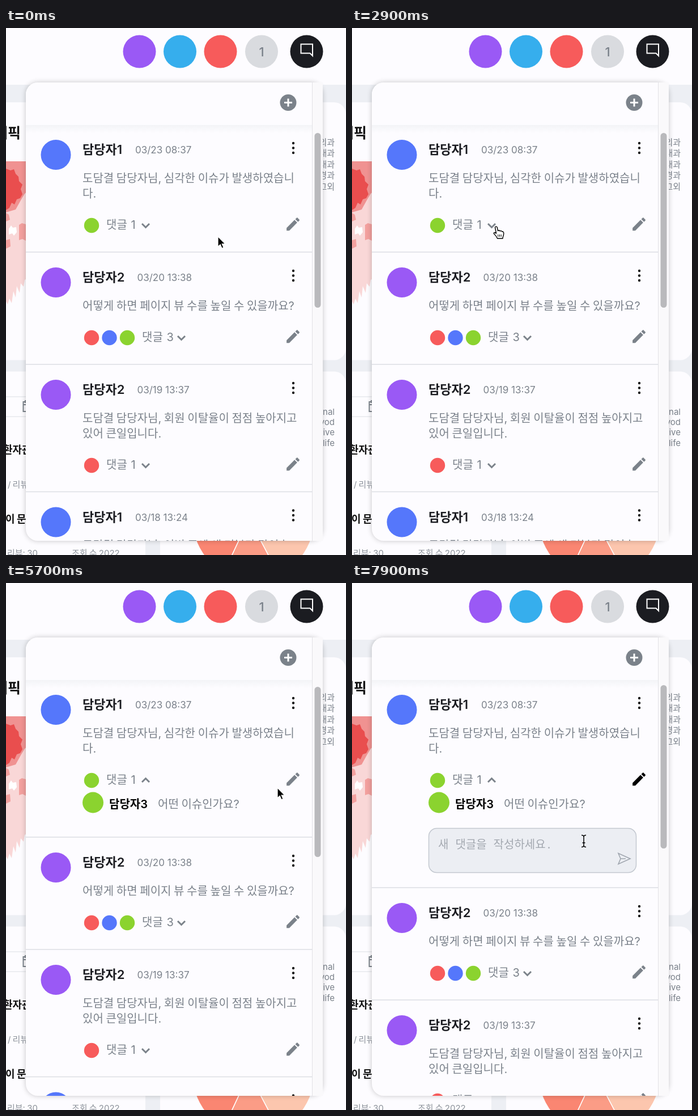
Animation, 600 px wide and 929 px high, one loop 8000 ms. Source, as an HTML page:

```html
<!DOCTYPE html>
<html lang="ko">
<head>
<meta charset="utf-8">
<style>
html, body { margin: 0; width: 100%; height: 100%; overflow: hidden; background: #edeff4; }
svg { display: block; width: 100vw; height: 100vh; }
text { font: 20px Inter, "Noto Sans CJK KR", "Noto Sans CJK", sans-serif; fill: #7a818a; word-spacing: -1px; white-space: pre; }
.name { font-size: 22px; font-weight: 600; fill: #1b1c21; }
.who { font-weight: 600; fill: #000; }
.date { font-size: 17px; word-spacing: 0; }
.count { word-spacing: 1px; }
.side { font-size: 15px; text-anchor: end; }
.small { font-size: 15px; fill: #8d939b; }
.bold { font-size: 18px; font-weight: 600; fill: #111; }
.hint { font-family: "Noto Sans Mono", "Noto Sans CJK KR", monospace; fill: #a3a8b0; word-spacing: 0; }
.line { fill: none; stroke: #7b828a; stroke-width: 3; }
.card { fill: #fdfcff; }
.pencil { fill: #7b828a; }
</style>
</head>
<body>
<svg viewBox="0 0 600 929" preserveAspectRatio="none">
  <defs>
    <clipPath id="inside"><rect x="35" y="96" width="524" height="808" rx="21"/></clipPath>
    <clipPath id="pie"><circle cx="436.5" cy="866" r="107"/></clipPath>
    <filter id="blur" x="-20%" y="-20%" width="140%" height="140%"><feGaussianBlur stdDeviation="5"/></filter>
    <linearGradient id="fade" x2="0" y2="1">
      <stop stop-color="#f3f4f7"/><stop offset="1" stop-color="#fdfcff"/>
    </linearGradient>
  </defs>

  <rect class="card" width="600" height="100"/>
  <rect class="card" x="-50" y="131" width="650" height="454.5" rx="21"/>
  <rect class="card" x="-50" y="605.5" width="296" height="400" rx="21"/>
  <rect class="card" x="272" y="605.5" width="328" height="400" rx="21"/>

  <g id="behind">
    <path fill="#f9d7d7" d="M0 235H40V440l-7 4-2 12-5-6-2 17-5-12-2 20-4-11-3 21-4-8-3 10-3-5z"/>
    <path fill="#f09291" d="M0 235H40V286l-7 6-6 10-10 18-17 5z"/>
    <path fill="#e94e4e" d="M0 248l8 3 6-2 3 8 5 5 1 8 6 6-3 8 3 9-4 7-6 2-4 9-5-3-4 9-6 4z"/>
    <path fill="#f2a09e" d="M0 326l5 3 2 9-7 3zM0 374l7-2 1 13-8 4zM23 347l5-3 7 2v29l-6-3-6 2z"/>
    <path fill="#fff" d="M5 354l4-6 3 4 6-1 1 9-5 6-3-4-6 2z"/>
    <text x="26" y="194" text-anchor="end" class="bold" style="font-size:25px">트래픽</text>
    <path d="M0 650H40M0 685H40" stroke="#dcdfe4"/>
    <path d="M40 659H30.5V676H40M30 664H40M34 656V661" class="line" style="stroke-width:2"/>
    <text x="-5" y="750" class="bold">환자관리</text>
    <text x="3" y="810" class="small">/ 리뷰</text>
    <text x="-1" y="872" class="bold">이 문</text>
    <text x="2" y="931" class="small">리뷰: 30</text>
    <text x="116" y="931" class="small">조회 수 2022</text>
    <g clip-path="url(#pie)" stroke="#fff" stroke-width="1.5">
      <path fill="#fa8672" d="M300 850H436L398 931H300z"/>
      <path fill="#fb9c86" d="M436 850L398 931H464L424 854z"/>
      <path fill="#fcc6ae" d="M421 850L464 931H580V850z"/>
    </g>
  </g>

  <g id="top"></g>
  <path d="M520.5 28.5H541V49l-4.5-4.5H520.5z" class="line" style="stroke:#fff;stroke-width:2"/>
  <text x="451" y="50" text-anchor="middle" style="font-size:22px;font-weight:500">1</text>

  <rect x="35" y="96" width="524" height="808" rx="21" opacity=".22" filter="url(#blur)"/>
  <rect class="card" x="35" y="96" width="524" height="808" rx="21"/>
  <g clip-path="url(#inside)">
    <rect x="35" y="171" width="505" height="14" fill="url(#fade)"/>
    <g id="list"></g>
    <rect class="card" x="35" y="96" width="505" height="75"/>
    <circle cx="498" cy="131.5" r="14.5" fill="#7b828a"/>
    <path d="M491 131.5H505M498 124.5V138.5" class="line" style="stroke:#fff"/>
  </g>
  <path d="M540 96H559V904H540z" fill="#faf9fb"/>
  <path d="M540.5 96V904" stroke="#e2e2e6"/>
  <rect id="thumb" x="544.5" width="11" rx="5.5" fill="#b9b9bc"/>
  <g id="cursor">
    <path id="arrow" d="M0 0V18L4.2 14.2 7 20.8 10 19.5 7.2 13.1H12.8z" stroke="#fff" stroke-width="1.2"/>
    <g id="hand" fill="#fff" stroke="#000" stroke-width="1.4" stroke-linejoin="round">
      <path d="M-2 1.5C-2-.5 1-.8 1.7 1.5L3 7.5C4 6.3 6.3 6.5 6.6 8 8 7 10 7.7 10.2 9 11.8 8.4 13.2 9.5 13.2 11.5 13.5 16 11.5 17 11.5 21H2C1 18-1.5 15.5-4 12.5-5 10.5-2.5 9.8-1 11.5L0 12z"/>
      <path d="M3.3 14V18M6 14V18M8.7 14V18" stroke-width="1"/>
    </g>
    <g id="beam" fill="none">
      <path d="M-4-10.5Q0-10.5 0-7.500V7.5Q0 10.5-4 10.5M4-10.5Q0-10.5 0-7.5M4 10.5Q0 10.5 0 7.5M-2.5 3H2.5" stroke="#000" stroke-width="1.5"/>
    </g>
  </g>
</svg>
<script>
const $ = id => document.getElementById(id);
const PURPLE = '#9a59f5', BLUE = '#5577fb', RED = '#f75b5b', GREEN = '#8bd32f', SKY = '#36aeed';
const dot = (x, y, r, fill) => `<circle cx="${x}" cy="${y}" r="${r}" fill="${fill}"/>`;
const label = (x, y, s, cls = '') => `<text x="${x}" y="${y}" class="${cls}">${s}</text>`;

$('top').innerHTML = [PURPLE, SKY, RED, '#d9dbdf', '#1b1c21']
  .map((c, i) => dot([235.5, 307, 378.5, 451, 530.5][i], 41.5, 29, c)).join('');
$('behind').innerHTML +=
  ['외과', '내과', '내과', '경과', '그외'].map((s, i) => label(580, 206.5 + i * 19.6, s, 'side')).join('') +
  ['nal', 'vod', 'ive', 'life'].map((s, i) => label(580, 682 + i * 18.2, s, 'side')).join('');

const posts = [
  { name: '담당자1', color: BLUE, date: '03/23 08:37', y: 0, replies: [GREEN],
    lines: ['도담결 담당자님, 심각한 이슈가 발생하였습니', '다.'] },
  { name: '담당자2', color: PURPLE, date: '03/20 13:38', y: 225, replies: [RED, BLUE, GREEN],
    lines: ['어떻게 하면 페이지 뷰 수를 높일 수 있을까요?'] },
  { name: '담당자2', color: PURPLE, date: '03/19 13:37', y: 423, replies: [RED],
    lines: ['도담결 담당자님, 회원 이탈율이 점점 높아지고', '있어 큰일입니다.'] },
  { name: '담당자1', color: BLUE, date: '03/18 13:24', y: 647.5, replies: [GREEN],
    lines: ['도담결 담당자님, 이번 주에 새 리뷰가 많이 늘', '었습니다.'] }
];
const PENCIL = 'M3 17.25V21h3.75L17.81 9.94l-3.75-3.75zM20.71 7.04c.39-.39.39-1.02 0-1.41l-2.34-2.34c-.39-.39-1.02-.39-1.41 0l-1.83 1.83 3.75 3.75z';

function drawPost(p) {
  const y = 321 + (p.lines.length - 1) * 27;
  const x = 177 + (p.replies.length - 1) * 31.5;
  return `<g class="post">
    ${dot(88, 223.5, 26.5, p.color)}
    ${label(135, 222, p.name, 'name')}
    ${label(p.name.endsWith('1') ? 228 : 231.5, 221, p.date, 'date')}
    ${[203, 211.5, 220].map(c => dot(507, c, 2.2, '#111')).join('')}
    ${p.lines.map((s, i) => label(135, 271.5 + i * 27, s)).join('')}
    ${p.replies.map((c, i) => dot(151 + i * 31.5, y, 13.2, c)).join('')}
    ${label(x, y + 5.5, '댓글 ' + p.replies.length, 'count')}
    <path class="line chevron" d="M${x + 63} ${y - 3}l6.5 6.5 6.5-6.5"/>
    <path class="pencil" d="${PENCIL}" transform="translate(491.3 ${y - 17.5}) scale(1.27)"/>
  </g>`;
}

const rule = y => `<path class="rule" d="M35 ${y}H540" stroke="#dcdee3" stroke-width="1.5"/>`;
$('list').innerHTML = posts.map(drawPost).join('') + [395, 593, 817.5].map(rule).join('') + `
  <g id="reply">${dot(153.5, 387, 18.5, GREEN)}
    ${label(182, 396.5, '담당자3', 'who')}${label(268, 396.5, '어떤 이슈인가요?')}</g>
  <g id="form">
    <rect x="135.5" y="432.5" width="366" height="78" rx="14" fill="#eceef3" stroke="#c3c8d0" stroke-width="1.5"/>
    ${label(152, 467.5, '새 댓글을 작성하세요.', 'hint')}
    <path d="M470 476.5L491 486 470 495.5 474 486zM474 486H483" class="line" style="stroke:#a0a6af;stroke-width:1.6"/>
  </g>`;
const groups = [...document.querySelectorAll('.post')];
const rules = [...document.querySelectorAll('.rule')];
const chevron = document.querySelector('.chevron'), pencil = document.querySelector('.pencil');

// Pointer stops: time, x, y
const path = [[0, 374, 367.5], [1400, 363, 336.5], [2600, 254.5, 350], [5000, 254.5, 350],
  [5700, 479, 361], [6200, 519.5, 345], [6800, 519.5, 345], [7600, 409, 455], [8000, 409, 455]];
const OPEN = 3300, WRITE = 6400;

function pointer(t) {
  const i = path.findIndex(p => p[0] > t);
  const [a, b] = [path[i - 1], path[i]];
  const k = (t - a[0]) / (b[0] - a[0]), e = k * k * (3 - 2 * k);
  return [a[1] + (b[1] - a[1]) * e, a[2] + (b[2] - a[2]) * e];
}

const show = (id, on) => $(id).setAttribute('visibility', on ? 'visible' : 'hidden');
const within = (x, y, l, t, r, b) => x >= l && x <= r && y >= t && y <= b;

function frame(now) {
  const t = Math.floor(now % 8000 / 100) * 100;
  const open = t >= OPEN, write = t >= WRITE;
  const shift = write ? 142 : open ? 53 : 0;
  groups.forEach((g, i) => g.setAttribute('transform', `translate(0 ${posts[i].y + (i && shift)})`));
  rules.forEach(r => r.setAttribute('transform', `translate(0 ${shift})`));
  chevron.setAttribute('d', open ? 'M240 351l6.5-6.5 6.5 6.5' : 'M240 345l6.5 6.5 6.5-6.5');
  pencil.style.fill = write ? '#000' : '';
  show('reply', open);
  show('form', write);
  $('thumb').setAttribute('y', write ? 180 : open ? 183 : 185);
  $('thumb').setAttribute('height', write ? 288 : open ? 300 : 308);

  const [x, y] = pointer(t);
  const hand = within(x, y, 177, 335, 256, 360) || within(x, y, 495, 333, 521, 358);
  const beam = write && within(x, y, 135, 432, 502, 511);
  $('cursor').setAttribute('transform', `translate(${x} ${y})`);
  show('hand', hand);
  show('beam', beam);
  show('arrow', !hand && !beam);
  requestAnimationFrame(frame);
}
requestAnimationFrame(frame);
</script>
</body>
</html>
```
